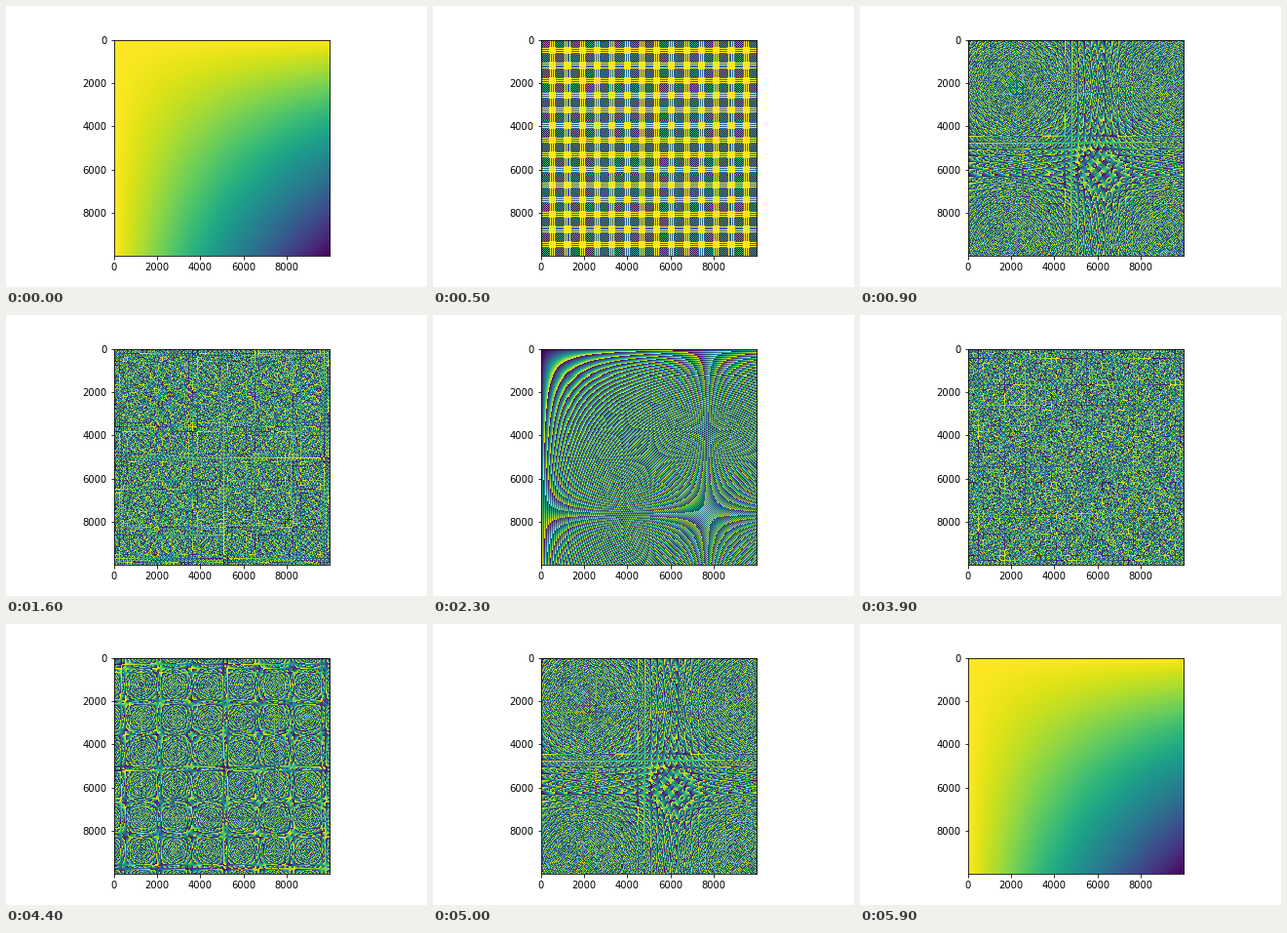
Animation, 432 px wide and 288 px high, one loop 6 s. Source, as a matplotlib script:

```python
import numpy as np
import matplotlib.pyplot as plt
from matplotlib.animation import FuncAnimation

SIZE = 9999        # factors run from 1 to SIZE
PIXELS = 218       # on-screen width of the table
FRAMES = 60

# Nearest-neighbour samples of the full multiplication table
factors = np.floor((np.arange(PIXELS) + 0.5) * SIZE / PIXELS) + 1
products = np.outer(factors, factors)
limits = np.array([1.0, float(SIZE) ** 2])


def table(step):
    """Products modulo 1e-8 * 4**step, scaled to the range 0..1."""
    modulus = 1e-8 * 4.0 ** step
    values = products % modulus
    ends = limits % modulus
    low = min(values.min(), ends.min())
    high = max(values.max(), ends.max())
    return (values - low) / (high - low)


fig, ax = plt.subplots(figsize=(6, 4), dpi=72)
image = ax.imshow(
    table(0), cmap="viridis", vmin=0, vmax=1, interpolation="nearest",
    extent=(-0.5, SIZE - 0.5, SIZE - 0.5, -0.5),
)


def update(frame):
    # Forward through the moduli, then back again
    image.set_data(table(min(frame, FRAMES - 1 - frame)))
    return [image]


anim = FuncAnimation(fig, update, frames=FRAMES, interval=100, repeat=True,
                     repeat_delay=0)
plt.show()
```
